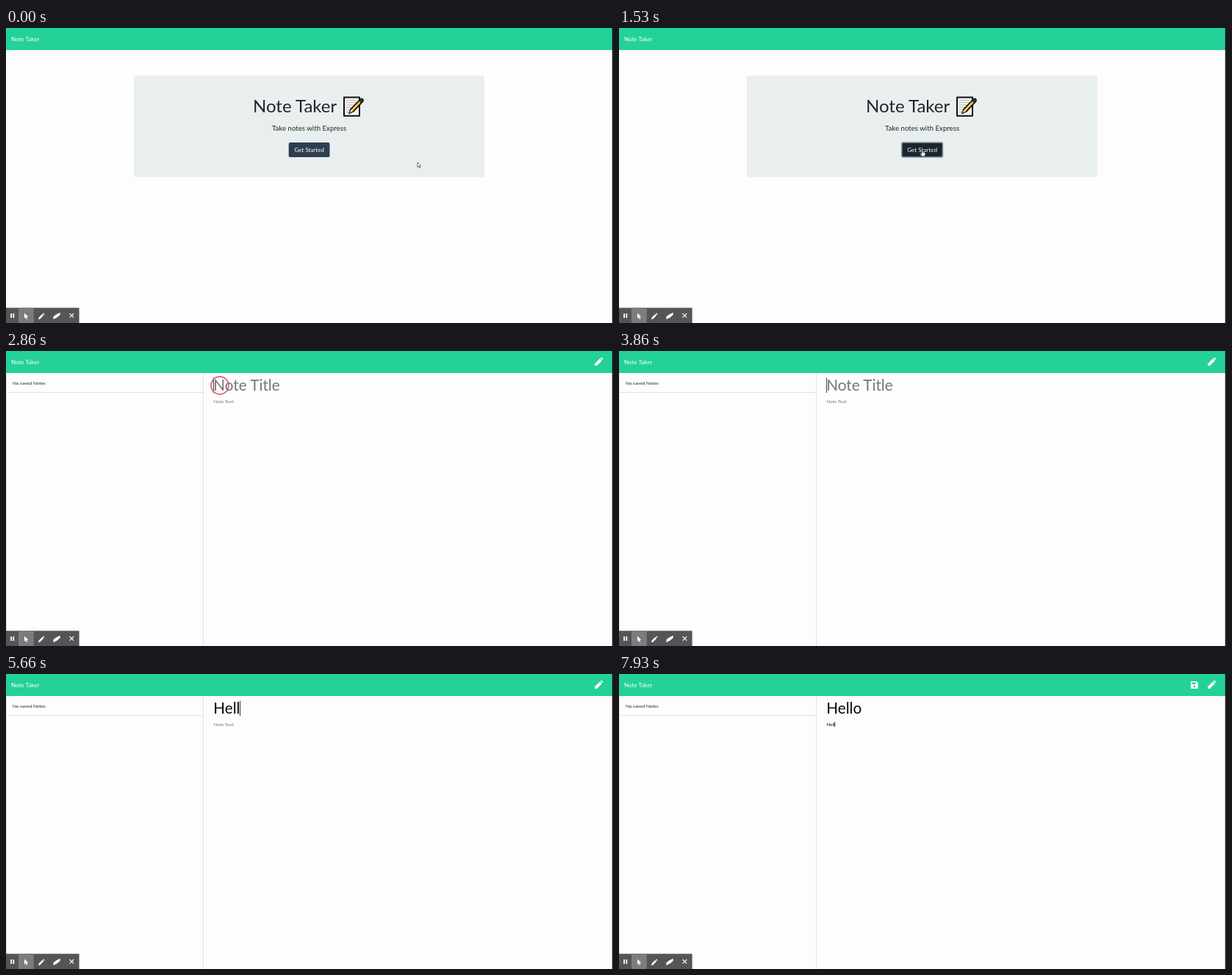
Write an HTML page that moves like this. It is 826 by 402 pixels and loops after 8000 ms.

```html
<!DOCTYPE html>
<html lang="en">
<head>
<meta charset="utf-8">
<title>Note Taker</title>
<style>
  html, body { margin: 0; width: 100%; height: 100%; overflow: hidden; background: #fdfdfd; }
  svg { display: block; width: 826px; height: 402px; font-family: Lato, sans-serif; }
  text { white-space: pre; }
  .mid { text-anchor: middle; }
  .brand { font-size: 8.06px; fill: #fff; }
  .small { font-size: 6.45px; }
  .title { font-size: 20.7px; }
  .rule { stroke: #e2e2e2; fill: none; }
</style>
</head>
<body>
<svg viewBox="0 0 826 402">
  <rect width="826" height="402" fill="#fdfdfd"/>
  <rect width="826" height="30" fill="#24d199"/>
  <text class="brand" x="7" y="18">Note Taker</text>

  <g id="home">
    <rect x="174" y="64.7" width="477" height="138.6" rx="2" fill="#e9efee"/>
    <text x="336" y="115" font-size="24" fill="#212529">Note Taker</text>
    <g id="memo" stroke-linejoin="round">
      <path d="M460 94.5H481V119.8H460Z" fill="#f4f4f4" stroke="#111" stroke-width="2"/>
      <path d="M463 98.5H477M463 101.7H477M463 104.9H474M463 108.1H471M463 111.3H468M463 114.5H466" stroke="#b5b5b5" stroke-width="1"/>
      <path d="M467 116.3L469.2 110.6L481.8 97.5Q484 95.5 485.4 97Q486.8 98.6 485 100.6L472.6 113.8Z" fill="#f5c542" stroke="#111" stroke-width="1.8"/>
      <path d="M480 99.4L482.4 97Q484 95.5 485.4 97Q486.8 98.6 483 102.4Z" fill="#333"/>
      <path d="M467.5 115.8L469.6 111.2L472 113.4Z" fill="#f2dfbd"/>
    </g>
    <text class="mid" x="412.5" y="140" font-size="9.67" fill="#212529">Take notes with Express</text>
    <rect id="button" x="384.7" y="156" width="55.8" height="20" rx="2" fill="#2c3e50" stroke="#8b98a3" stroke-width="0"/>
    <text class="mid brand" x="412.6" y="169">Get Started</text>
  </g>

  <g id="notes">
    <path class="rule" d="M.5 30V402M268.5 30V402M0 56.5H268"/>
    <text class="small" x="9" y="46" fill="#212529">No saved Notes</text>
    <text class="title" id="title" x="282.3" y="54"></text>
    <text class="small" id="body" x="282.3" y="70.8"></text>
    <path id="caret" stroke="#222" stroke-width=".9"/>
    <path id="pencil" fill="#fff" d="M801.2 20V17.2L808.2 10.2L811 13L804 20ZM808.9 9.5L809.7 8.9Q810.3 8.5 810.9 9.1L812 10.2Q812.6 10.8 812 11.5L811.5 12.2Z"/>
    <path id="save" fill="#fff" fill-rule="evenodd" d="M779.2 10H785.7L788 12.3V18.8Q788 20 786.8 20H779.2Q778 20 778 18.8V11.2Q778 10 779.2 10ZM779.5 11.5V14H784.8V11.5ZM783 15.4A1.5 1.5 0 1 0 783.01 15.4Z"/>
  </g>

  <g id="toolbar">
    <rect y="381.3" width="99.6" height="20.7" fill="#555"/>
    <rect x="17" y="381.3" width="20.8" height="20.7" fill="#7c7c7c"/>
    <g fill="#fff">
      <path d="M6.2 389H8V395H6.2ZM9.4 389H11.2V395H9.4Z"/>
      <path d="M25 388.4L30.3 393.5L28 393.8L29.3 396.6L28.1 397.1L26.8 394.3L25 395.8Z"/>
      <path d="M44 397L44.6 394.6L49.4 389.8L51.2 391.6L46.4 396.4ZM50 389.2L51 388.3L52.6 390L51.8 391Z"/>
      <path d="M64.3 393.5L68.4 390.3L73.6 387.8V391L69.5 394.5L64.5 397Z"/>
    </g>
    <path d="M86.6 389L92.2 394.6M92.2 389L86.6 394.6" stroke="#fff" stroke-width="1.1"/>
  </g>

  <circle id="ring" fill="none" stroke="#dc4f5c" stroke-width="1.8"/>
  <path id="arrow" d="M0 0V6.6L1.5 5.3L2.6 7.8L3.7 7.3L2.7 4.9H4.7Z" fill="#fff" stroke="#333" stroke-width=".7"/>
  <path id="hand" d="M-.9 .7Q0 -.4 .8 .7V3.2L3.4 3.8Q4.3 4.1 4.2 5L3.5 8.8H-.6L-2.8 5.8Q-3 4.6-1.9 4.9L-.9 5.8Z" fill="#fff" stroke="#333" stroke-width=".7"/>
  <path d="M825.4 0V402" stroke="#111" stroke-width="1.1"/>
</svg>
<script>
const LOOP = 8000;
const PAGE = 1595, FOCUS_TITLE = 2795, FOCUS_BODY = 6525;
const titleKeys = [5060, 5260, 5460, 5595, 5800];
const bodyKeys = [7260, 7530, 7730, 7925];
const mouse = [[60, 560, 183], [860, 479, 159], [1060, 447, 152], [1200, 447, 152], [1330, 412.7, 166]];
const clicks = [[1330, 413, 167], [2795, 291, 47]];

const $ = id => document.getElementById(id);
const show = (id, on) => $(id).setAttribute('visibility', on ? 'inherit' : 'hidden');
const set = (id, attrs) => {
  for (const name in attrs) $(id).setAttribute(name, attrs[name]);
};

function mouseAt(t) {
  const i = mouse.findIndex(p => p[0] > t);
  if (i < 0) return mouse.at(-1).slice(1);
  if (i === 0) return mouse[0].slice(1);
  const [t0, x0, y0] = mouse[i - 1], [t1, x1, y1] = mouse[i];
  const k = (t - t0) / (t1 - t0);
  return [x0 + (x1 - x0) * k, y0 + (y1 - y0) * k];
}

function drawField(id, keys, placeholder, t) {
  const typed = 'Hello'.slice(0, keys.filter(k => k <= t).length);
  $(id).textContent = typed || placeholder;
  set(id, { fill: typed ? '#080808' : '#757575' });
  return typed ? $(id).getComputedTextLength() : 0;
}

function drawCaret(t, titleWidth, bodyWidth) {
  const inBody = t >= FOCUS_BODY;
  const last = Math.max(...[FOCUS_TITLE, FOCUS_BODY, ...titleKeys, ...bodyKeys].filter(k => k <= t));
  show('caret', t >= FOCUS_TITLE && (t - last) % 1060 < 530);
  const x = 282.4 + (inBody ? bodyWidth : titleWidth);
  set('caret', { d: inBody ? `M${x} 65V72` : `M${x} 36.5V57` });
}

function drawMouse(t) {
  const [x, y] = mouseAt(t);
  const over = x > 384 && x < 441 && y > 156;
  show('arrow', t < PAGE && !over);
  show('hand', over && t < 2000);
  for (const id of ['arrow', 'hand']) set(id, { transform: `translate(${x} ${y})` });
  const pressed = t >= 1400;
  set('button', { fill: pressed ? '#1a252f' : over ? '#1e2b37' : '#2c3e50', 'stroke-width': pressed ? 1.6 : 0 });

  const click = clicks.find(c => t >= c[0] && t < c[0] + 200);
  show('ring', click);
  if (click) {
    const age = t - click[0];
    set('ring', {
      cx: click[1], cy: click[2],
      r: 6 + 6 * Math.min(1, age / 65),
      opacity: .85 * Math.min(1, (200 - age) / 135)
    });
  }
}

function draw() {
  const t = performance.now() % LOOP;
  show('home', t < PAGE);
  show('notes', t >= PAGE);
  show('save', t >= PAGE && t >= bodyKeys[0] + 60);
  const titleWidth = drawField('title', titleKeys, 'Note Title', t);
  const bodyWidth = drawField('body', bodyKeys, 'Note Text', t);
  drawCaret(t, titleWidth, bodyWidth);
  drawMouse(t);
  requestAnimationFrame(draw);
}
draw();
</script>
</body>
</html>
```
